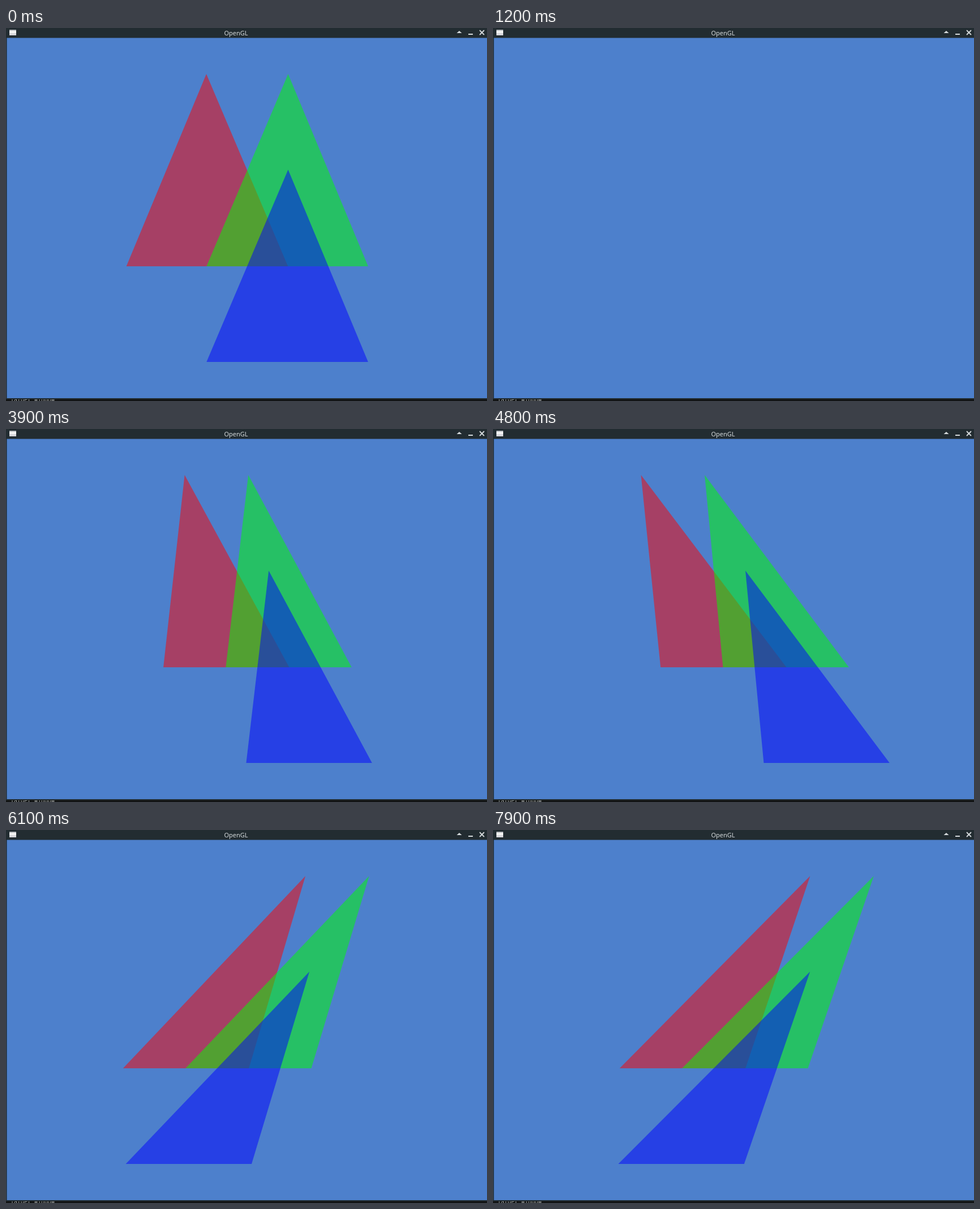
Animation, 850 px wide and 659 px high, one loop 8000 ms. Source, as an HTML page with a canvas:

```html
<!DOCTYPE html>
<html lang="en">
<head>
<meta charset="utf-8">
<title>OpenGL</title>
<style>
  html, body { margin: 0; width: 100%; height: 100%; overflow: hidden; background: #222c31; }
  canvas { display: block; }
</style>
</head>
<body>
<canvas id="stage" width="850" height="659"></canvas>
<script>
const ctx = document.getElementById('stage').getContext('2d');
const LOOP = 8000, TICK = 100;
const CENTER = { x: 426.3, y: 336 };
const HEIGHT = 339.8;

// Each tick moves the triangles one step, apart from one long rest and these short halts.
const REST = { start: 12, length: 16 };
const HALTS = [2, 31, 34, 37, 41, 47, 53, 60, 63, 65, 67, 70, 71, 72, 75, 77];

function stepsAt(time) {
  const tick = Math.floor(time / TICK);
  const rested = Math.min(Math.max(tick - REST.start, 0), REST.length);
  return tick - rested - HALTS.filter(halt => halt <= tick).length;
}

// Straight line from `from` to `to` between two steps, flat outside them.
function ramp(step, start, end, from, to) {
  const progress = Math.min(Math.max((step - start) / (end - start), 0), 1);
  return from + (to - from) * progress;
}

const scaleAt = step => step < 11
  ? ramp(step, 0, 10, 142.8, 7)
  : ramp(step, 11, 17, 0, 111.2);

const shearAt = step => step < 24
  ? ramp(step, 17, 23, 0, 0.64)
  : Math.max(ramp(step, 24, 38, 0.617, -0.72), -2 / 3);

const shiftAt = step => step < 42
  ? ramp(step, 37.6, 42, 0, -195.4)
  : ramp(step, 42, 47, -195.4, 20.5);

function polygon(color, points) {
  ctx.fillStyle = color;
  ctx.beginPath();
  points.forEach(([x, y]) => ctx.lineTo(x, y));
  ctx.fill();
}

function rect(color, x, y, w, h) {
  ctx.fillStyle = color;
  ctx.fillRect(x, y, w, h);
}

function text(label, x, y, font, color) {
  ctx.font = font;
  ctx.fillStyle = color;
  ctx.fillText(label, x, y);
}

function drawWindow() {
  rect('#121414', 0, 654, 850, 5);
  text('Target window', 8, 660, '10px "Noto Sans Mono", monospace', '#aaaeae');
  rect('#222c31', 0, 0, 850, 656);
  rect('#4d80cc', 1.5, 17.5, 848.5, 636.5);

  rect('#f4f4f4', 6, 3, 12, 10);
  rect('#b9bcc0', 6, 3, 12, 2);
  rect('#d8d8dc', 6, 9, 12, 4);
  text('OpenGL', 385.5, 12.5, '11px "Noto Sans", sans-serif', '#d5dadc');

  polygon('#d5dadc', [[796.5, 9], [801, 5], [805.5, 9]]);
  rect('#d5dadc', 817, 10, 8, 2);
  ctx.strokeStyle = '#d5dadc';
  ctx.lineWidth = 1.8;
  ctx.beginPath();
  ctx.moveTo(837, 4);
  ctx.lineTo(845, 12);
  ctx.moveTo(845, 4);
  ctx.lineTo(837, 12);
  ctx.stroke();
}

function drawTriangles(step) {
  const scale = scaleAt(step), shear = shearAt(step), shift = shiftAt(step);
  const place = (x, y) => [CENTER.x + x * scale + shear * (y - CENTER.y) + shift, y];
  const triangle = (color, side, base) => polygon(color, [
    place(side * 0.506, base - HEIGHT),
    place(side * 0.496 - 1, base),
    place(side * 0.496 + 1, base)
  ]);

  ctx.globalAlpha = 0.5;
  triangle('#f00', -1, 421);
  triangle('#0f0', 1, 421);
  triangle('#00f', 1, 590);
  ctx.globalAlpha = 1;
}

function frame() {
  drawWindow();
  drawTriangles(stepsAt(performance.now() % LOOP));
  requestAnimationFrame(frame);
}
frame();
</script>
</body>
</html>
```
